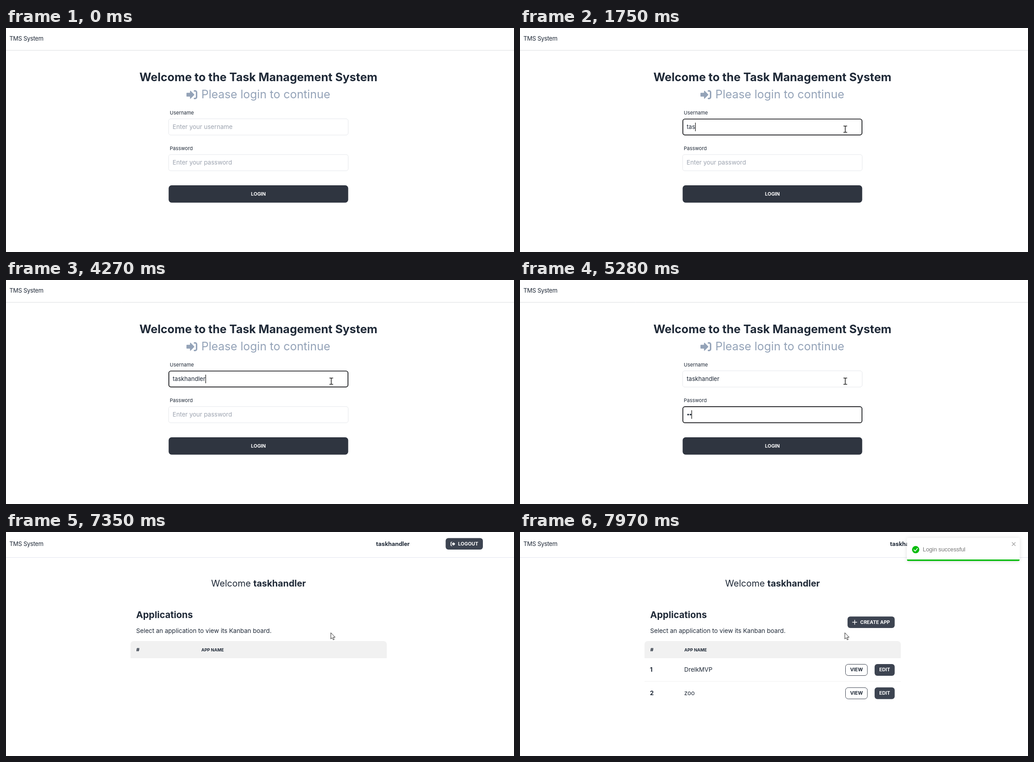
An HTML page for the animation above (8 s loop, 1126 px wide and 497 px high).

```html
<!DOCTYPE html>
<html lang="en">
<head>
<meta charset="utf-8">
<title>TMS System</title>
<style>
html, body { margin: 0; width: 100%; height: 100%; overflow: hidden; background: #fff; }
svg { display: block; width: 1126px; height: 497px; }
text {
  font: 400 13.35px Inter, "Open Sans", sans-serif;
  font-optical-sizing: none;
  fill: #1f2937;
  white-space: pre;
}
.b { font-weight: 700; }
.mid { text-anchor: middle; }
.brand { font-size: 13px; letter-spacing: -.24px; }
.title { font-size: 25.45px; font-weight: 700; }
.sub { font-size: 25.3px; fill: #94a3b8; }
.label { font-size: 11px; }
.hint { font-size: 13.5px; fill: #9ca3af; }
.typed { font-size: 13.1px; }
.btn { font-size: 10.6px; font-weight: 700; text-anchor: middle; }
.light { fill: #fff; }
.h2 { font-size: 20.4px; font-weight: 700; }
.hello { font-size: 20px; text-anchor: middle; }
.lead { font-size: 13.6px; }
.th { font-size: 9.4px; font-weight: 700; }
.note { font: 12.78px "Liberation Sans", Arial, sans-serif; fill: #757575; }
.field { fill: #fff; stroke: #e5e7eb; }
.ring { fill: none; stroke: #101114; stroke-width: 1.7; }
.dark { fill: #3d4451; }
.line { fill: none; stroke-linecap: round; stroke-linejoin: round; }

/* one 8 s timeline; the script sets the time */
.anim { animation: 8s step-end infinite paused; }
#login { animation-name: login; }
#board { animation-name: board; }
#early { animation-name: early; }
#late { animation-name: late; }
#ring1 { animation-name: ring1; }
#ring2 { animation-name: ring2; }
#ring3 { animation-name: ring3; }
#caret { animation-name: blink; }
#arrow { animation-name: arrow; }
#beam { animation-name: beam; }
#pointer { animation-name: move; animation-timing-function: ease-in-out; }
#toast { animation-name: toast; animation-timing-function: cubic-bezier(.215, .61, .355, 1); }

@keyframes login { 0% { opacity: 1 } 91%, 100% { opacity: 0 } }
@keyframes board { 0% { opacity: 0 } 91%, 100% { opacity: 1 } }
@keyframes early { 0% { opacity: 1 } 92.75%, 100% { opacity: 0 } }
@keyframes late { 0% { opacity: 0 } 92.75%, 100% { opacity: 1 } }
@keyframes ring1 { 0% { opacity: 0 } 9.375% { opacity: 1 } 57.625%, 100% { opacity: 0 } }
@keyframes ring2 { 0% { opacity: 0 } 57.625% { opacity: 1 } 86.125%, 100% { opacity: 0 } }
@keyframes ring3 { 0% { opacity: 0 } 86.125% { opacity: 1 } 91%, 100% { opacity: 0 } }
@keyframes blink {
  0%, 16%, 31%, 64.25%, 86.125%, 100% { opacity: 0 }
  9.375%, 17.75%, 37.625%, 57.625%, 65.125% { opacity: 1 }
}
@keyframes arrow { 0%, 7%, 100% { opacity: 0 } 1.75%, 91% { opacity: 1 } }
@keyframes beam { 0%, 91%, 100% { opacity: 0 } 7% { opacity: 1 } }
@keyframes move {
  0%, 1.75% { transform: translate(1059px, 431px) }
  8.625%, 100% { transform: translate(719.5px, 223px) }
}
@keyframes toast {
  0%, 92.75% { transform: translateX(2370px); opacity: 0 }
  98% { transform: translateX(-20px); opacity: 1 }
  99.3125% { transform: translateX(5px); opacity: 1 }
  100% { transform: translateX(-3px); opacity: 1 }
}
</style>
</head>
<body>
<svg viewBox="0 0 1126 497">
  <defs>
    <filter id="shadow" x="-10%" y="-40%" width="120%" height="180%">
      <feDropShadow dx="0" dy="1" stdDeviation="4" flood-color="#000" flood-opacity=".14"/>
    </filter>
    <g id="actions">
      <rect x="721.5" y="293.5" width="48.5" height="25" rx="6" fill="#fff" stroke="#3d4451"/>
      <text class="btn" x="745.8" y="309">VIEW</text>
      <rect class="dark" x="786" y="293" width="44.5" height="26" rx="6"/>
      <text class="btn light" x="808.3" y="309">EDIT</text>
    </g>
  </defs>

  <g id="login" class="anim">
    <text class="brand" x="7.5" y="27.5">TMS System</text>
    <path d="M0 49.5H1126" stroke="#dcdde0"/>
    <text class="title mid" x="559.5" y="118">Welcome to the Task Management System</text>
    <g class="line" stroke="#94a3b8">
      <path d="M401 144.8H408.8V140.3L416.4 148L408.8 155.7V151.2H401Z" fill="#94a3b8" stroke-width="2"/>
      <path d="M417.6 139.7H419.4a3 3 0 0 1 3 3v10.6a3 3 0 0 1-3 3H417.6" stroke-width="3.2"/>
    </g>
    <text class="sub" x="433" y="156">Please login to continue</text>

    <text class="label" x="363" y="192">Username</text>
    <rect class="field" x="360.5" y="201.5" width="398" height="36" rx="4.5"/>
    <text id="hint1" class="hint" x="369.3" y="224">Enter your username</text>
    <text id="user" class="typed" x="369.5" y="224"></text>
    <rect id="ring1" class="ring anim" x="361" y="202" width="397" height="35.3" rx="4.5"/>

    <text class="label" x="363" y="271.3">Password</text>
    <rect class="field" x="360.5" y="280.8" width="398" height="36" rx="4.5"/>
    <text id="hint2" class="hint" x="369.3" y="303.3">Enter your password</text>
    <g id="dots" fill="#1f2937"></g>
    <rect id="ring2" class="ring anim" x="361" y="281.2" width="397" height="35.5" rx="4.5"/>

    <rect id="caret" class="anim" width="1.2" height="19" fill="#111"/>

    <rect x="360.5" y="349" width="398" height="38.5" rx="6.5" fill="#2f3540"/>
    <text class="btn light" x="559.5" y="371.8">LOGIN</text>
    <rect id="ring3" class="ring anim" x="359.5" y="348" width="400" height="40.5" rx="7.5"/>
  </g>

  <g id="board" class="anim">
    <text class="brand" x="7.5" y="30.5">TMS System</text>
    <path d="M0 56.5H1126" stroke="#e3e4ef"/>
    <text class="b name" x="820.3" y="30.5" style="font-size:12.8px"></text>
    <rect class="dark" x="974.5" y="13.5" width="82.5" height="25.5" rx="6"/>
    <g class="line" stroke="#fff">
      <path d="M988.5 22.6H987.4a1.4 1.4 0 0 0-1.4 1.4v5a1.4 1.4 0 0 0 1.4 1.4H988.5" stroke-width="1.5"/>
      <path d="M989 25.4H991.8V23L995.2 26.5L991.8 30V27.6H989Z" fill="#fff" stroke-width=".9"/>
    </g>
    <text class="btn light" x="1024.5" y="30">LOGOUT</text>

    <text class="hello" x="559.8" y="121">Welcome <tspan class="b name"></tspan></text>
    <text class="h2" x="288.5" y="191">Applications</text>
    <text class="lead" x="288.5" y="223.7">Select an application to view its Kanban board.</text>
    <path d="M276 280V249a7 7 0 0 1 7-7H837a7 7 0 0 1 7 7V280Z" fill="#f1f1f1"/>
    <text class="th" x="288.8" y="264.6" style="font-size:11px">#</text>
    <text id="early" class="th anim" x="433" y="264.5">APP NAME</text>

    <g id="late" class="anim">
      <text class="th" x="364.3" y="264.5">APP NAME</text>
      <rect class="dark" x="726" y="187.5" width="104.5" height="25.5" rx="6"/>
      <path class="line" d="M737 200.3H746.6M741.8 195.5V205.1" stroke="#fff" stroke-width="1.4"/>
      <text class="btn light" x="787" y="203.8">CREATE APP</text>
      <text class="b" x="288" y="310.3">1</text>
      <text x="364" y="310.3">DrelkMVP</text>
      <path d="M276 331.5H844" stroke="#f1f1f1"/>
      <text class="b" x="288" y="361.8">2</text>
      <text x="364" y="361.8">zoo</text>
      <use href="#actions"/>
      <use href="#actions" y="51.8"/>
    </g>

    <g id="toast" class="anim held">
      <rect x="858" y="13" width="249.5" height="51" rx="3" fill="#fff" filter="url(#shadow)"/>
      <path d="M858 61H1107.5V62a2.2 2.2 0 0 1-2.2 2.2H860.2a2.2 2.2 0 0 1-2.2-2.2Z" fill="#07bc0c"/>
      <circle cx="877.2" cy="39.2" r="8.1" fill="#07bc0c"/>
      <path class="line" d="M873.4 39.6L876.2 42.4L881.3 36.3" stroke="#fff" stroke-width="1.6"/>
      <text class="note" x="893" y="43.3">Login successful</text>
      <path class="line" d="M1091 23.2L1098 30.2M1098 23.2L1091 30.2" stroke="#a6a6a6" stroke-width="1.5"/>
    </g>
  </g>

  <g id="pointer" class="anim held">
    <path id="arrow" class="anim" d="M.5 .5V14.3L3.6 11.4L5.8 16.3L8 15.3L5.9 10.5H10Z" fill="#fff" stroke="#222" stroke-width="1"/>
    <path id="beam" class="anim" d="M-2.5 -5.5H.3L1.5 -4.8L2.7 -5.5H5.5M1.5 -4.8V7.8M-2.5 8.5H.3L1.5 7.8L2.7 8.5H5.5" fill="none" stroke="#111" stroke-width="1.5"/>
  </g>
</svg>

<script>
const LOOP = 8000, STEP = 68.6, FIRST = 140, DOT = 5.18;
const NAME = 'taskhandler';
const $ = id => document.getElementById(id);

// [time, letters shown, stray letter]
const nameKeys = [
  [1420, 1], [1620, 2], [1750, 3], [1950, 3, 'e'], [2680, 3], [3210, 4], [3340, 5],
  [3540, 7], [3950, 8], [4060, 9], [4160, 10], [4270, 11]
];
const passKeys = [5210, 5280, 5480, 5880, 5980, 6080, 6410, 6610];

document.querySelectorAll('.name').forEach(el => el.textContent = NAME);
const dots = passKeys.map((_, i) => {
  const dot = document.createElementNS('http://www.w3.org/2000/svg', 'circle');
  dot.setAttribute('cx', 372.7 + i * DOT);
  dot.setAttribute('cy', 298.6);
  dot.setAttribute('r', 1.9);
  return $('dots').appendChild(dot);
});

function typedName(t) {
  const key = nameKeys.filter(k => k[0] <= t).pop();
  return key ? NAME.slice(0, key[1]) + (key[2] || '') : '';
}

function show(el, on) {
  el.style.visibility = on ? 'visible' : 'hidden';
}

function drawFields(t) {
  const text = typedName(t);
  const count = passKeys.filter(k => k <= t).length;
  $('user').textContent = text;
  show($('hint1'), !text);
  show($('hint2'), !count);
  dots.forEach((dot, i) => show(dot, i < count));

  const inPass = t >= 4610;
  const width = inPass ? count * DOT : text ? $('user').getComputedTextLength() : 0;
  $('caret').setAttribute('x', 369.6 + width);
  $('caret').setAttribute('y', inPass ? 289 : 210);
}

const anims = document.getAnimations();
const start = performance.now();

function frame(now) {
  const t = Math.max(0, now - start) % LOOP;
  // pointer and toast move in short holds
  const held = Math.max(0, FIRST + Math.floor((t - FIRST) / STEP) * STEP);
  for (const a of anims) {
    a.currentTime = a.effect.target.classList.contains('held') ? held : t;
  }
  drawFields(t);
  requestAnimationFrame(frame);
}
frame(start);
</script>
</body>
</html>
```
